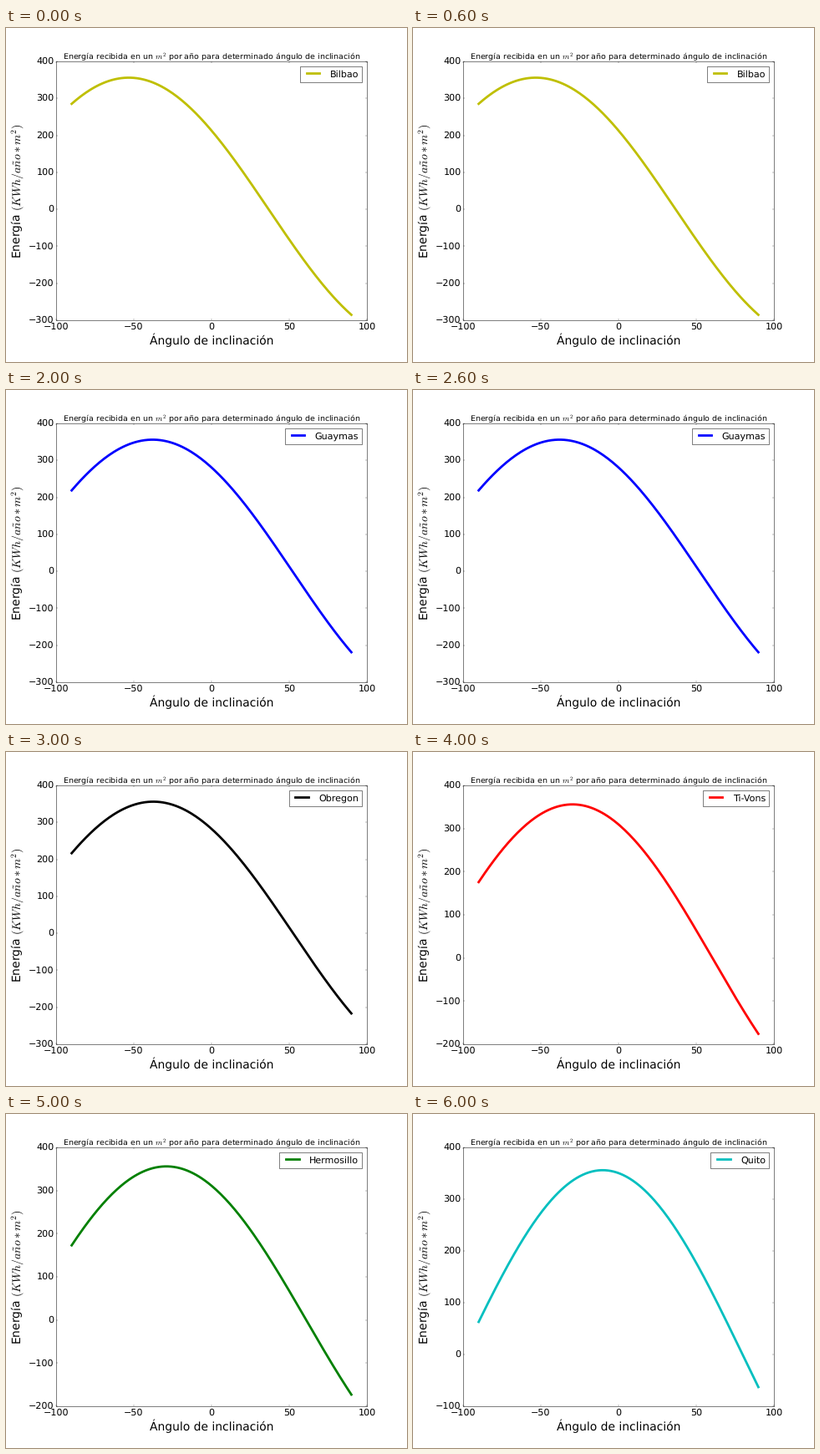
A matplotlib script that plays this animation: 480 px wide and 400 px high, repeating every 7000 ms.

```python
import numpy as np
import matplotlib.pyplot as plt
from matplotlib.animation import FuncAnimation

U = 0.5  # size of one layout point at 80 dpi
HAIRLINE = 0.9 * U  # stays below half a pixel, so edges come out grey

plt.style.use("classic")
plt.rcParams.update({
    "font.family": "DejaVu Sans",
    "mathtext.fontset": "cm",
    "text.hinting": "none",
    "text.kerning_factor": 0,
    "axes.linewidth": HAIRLINE,
    "patch.linewidth": HAIRLINE,
    "legend.fontsize": 20 * U,
    "axes.titlepad": 5 * U,
    "axes.labelpad": 5 * U,
})
for axis in ("xtick", "ytick"):
    plt.rcParams.update({
        axis + ".labelsize": 20 * U,
        axis + ".major.size": 4 * U,
        axis + ".major.width": 0.5 * U,
        axis + ".major.pad": 4 * U,
    })

PEAK = 356
# place, colour, best tilt in degrees, lower energy limit
PLACES = [
    ("Bilbao", "y", 53.26, -300),
    ("Moscow", "m", 47.5, -300),
    ("Guaymas", "b", 37.92, -300),
    ("Obregon", "k", 37.48, -300),
    ("Ti-Vons", "r", 29.6, -200),
    ("Hermosillo", "g", 29.07, -200),
    ("Quito", "c", 10.18, -100),
]

fig = plt.figure(figsize=(6, 5), dpi=80, facecolor="white")
ax = fig.add_axes([0.125, 0.125, 0.775, 0.775])
ax.set_xlim(-100, 100)
ax.set_xticks(range(-100, 101, 50))
ax.set_title("Energía recibida en un $m^2$ por año para determinado "
             "ángulo de inclinación", fontsize=17 * U)
ax.set_xlabel("Ángulo de inclinación", fontsize=25 * U)
ax.set_ylabel(r"Energía $(KWh/a\tilde{n}o*m^2)$", fontsize=25 * U)

angle = np.arange(-90, 91)
line, = ax.plot([], [], lw=5 * U)


def update(i):
    name, color, tilt, low = PLACES[i]
    line.set_data(angle, PEAK * np.cos(np.radians(angle + tilt)))
    line.set_color(color)
    line.set_label(name)
    ax.set_ylim(low, 400)
    ax.set_yticks(range(low, 401, 100))
    ax.legend(loc="upper right")
    return line,


anim = FuncAnimation(fig, update, frames=len(PLACES), init_func=lambda: (line,),
                     interval=1000, repeat=True, repeat_delay=0)
plt.show()
```
